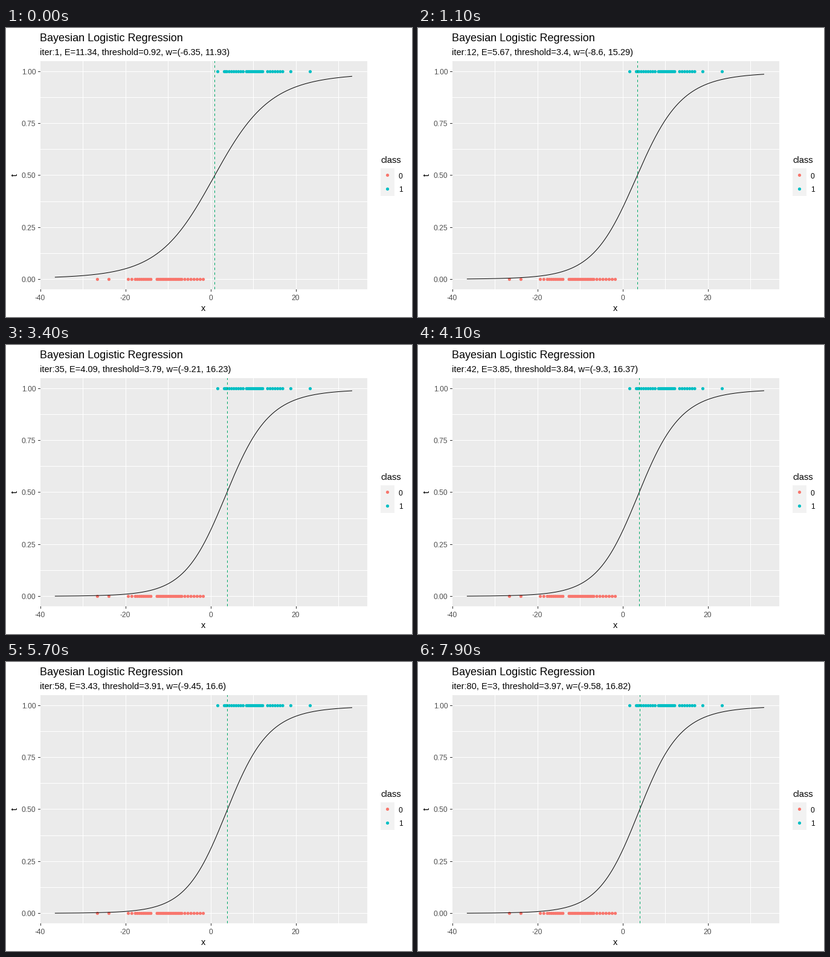
Recreate the animation shown at these times as a matplotlib script. Size 672 by 480 pixels, loop 8000 ms.

```python
import numpy as np
import matplotlib.pyplot as plt
from matplotlib.animation import FuncAnimation
from matplotlib.patches import Circle, Rectangle

W, H, DPI = 672, 480, 96
FRAMES, INTERVAL = 80, 100
PX = 72 / DPI                      # one pixel in points
RED, TEAL, GREEN = "#F8766D", "#00BFC4", "#00A968"
LEFT, TOP, RIGHT, BOTTOM = 57, 55, 598, 434

plt.rcParams["font.family"] = "Liberation Sans"
fig = plt.figure(figsize=(W / DPI, H / DPI), dpi=DPI, facecolor="white")
ax = fig.add_axes([0, 0, 1, 1])
ax.set_xlim(0, W)
ax.set_ylim(H, 0)
ax.axis("off")


def to_px(x):
    return 338.9 + 7.05 * np.asarray(x)


def to_py(t):
    return 417 - 345 * np.asarray(t)


def center(v):
    """Middle of the pixel nearest to v."""
    return np.round(v) + 0.5


def sigmoid(a):
    return 1 / (1 + np.exp(-a))


def rect(x, y, w, h, color):
    ax.add_patch(Rectangle((x, y), w, h, fc=color, lw=0, zorder=0))


def line(xs, ys, color, z=1, **kw):
    return ax.plot(xs, ys, color=color, lw=PX, zorder=z, snap=False,
                   solid_capstyle="butt", dash_capstyle="butt", **kw)[0]


def label(x, y, s, size, color="black", ha="left", **kw):
    return ax.text(x, y, s, size=size, color=color, ha=ha, va="baseline", **kw)


def dots(xs, y, color):
    for x in xs:
        ax.add_patch(Circle((x, y), 2.6, fc=color, lw=0, zorder=2))


# Panel, grid, axes
rect(LEFT, TOP, RIGHT - LEFT, BOTTOM - TOP, "#EBEBEB")
for x in range(-30, 31, 10):
    line([center(to_px(x))] * 2, [TOP, BOTTOM], "white")
for t in np.arange(0, 1.01, 0.125):
    line([LEFT, RIGHT], [center(to_py(t))] * 2, "white")
for x in range(-40, 21, 20):
    c = center(to_px(x))
    line([c, c], [BOTTOM, BOTTOM + 4], "#333333")
    label(c - 1, 451.5, str(x), 9, "#4D4D4D", "center")
for t in np.arange(0, 1.01, 0.25):
    c = center(to_py(t))
    line([LEFT - 4, LEFT], [c, c], "#333333")
    label(49.5, c + 4.5, f"{t:.2f}", 9, "#4D4D4D", "right")
label(326.5, 469.5, "x", 11, ha="center")
label(19, 244, "t", 11, ha="center", rotation=90, rotation_mode="anchor")


def spread(ranks, values):
    """Observations placed evenly between a few ranked values."""
    return np.interp(np.arange(ranks[-1] + 1), ranks, values)


class0 = spread([0, 1, 2, 4, 12, 13, 28, 35],
                [-26.6, -23.9, -19.35, -17.7, -14.05, -12.6, -6.8, -1.75])
class1 = spread([0, 1, 3, 10, 11, 22, 23, 29, 30, 31],
                [1.65, 3.2, 3.8, 7.6, 8.4, 12.2, 13.35, 16.9, 18.8, 23.35])
dots(to_px(class0), center(to_py(0)), RED)
dots(to_px(class1), center(to_py(1)), TEAL)

# Legend
label(620, 224, "class", 11)
rect(620, 233, 23, 46, "#F2F2F2")
for y, name, color in ((244.5, "0", RED), (267.5, "1", TEAL)):
    dots([631.5], y, color)
    label(650, y + 5, name, 9)

label(56, 22, "Bayesian Logistic Regression", 13.5)
subtitle = label(56, 45, "", 11)


# Model: p(x) = sigmoid(w0 + w1 * basis(x)), training slows as a power law
def basis(x):
    return sigmoid(0.0495 * (x + 1.694))


def threshold(n):
    return 4.3 - 3.38 * n ** -0.5318


def weights(n):
    w1 = 19.6 - 7.67 * n ** -0.2315
    return -w1 * basis(threshold(n)), w1


def error(n):
    return 11.34 * n ** -0.2751 - 0.005 * (n - 1)


xs = np.linspace(-36.6, 33.2, 400)
curve = line(to_px(xs), xs, "black", 3)
cut = line([0, 0], [BOTTOM, TOP], GREEN, 4, linestyle=(0, (4, 4)))


def short(v):
    return f"{round(float(v), 2):g}"


def update(i):
    n = i + 1
    w0, w1 = weights(n)
    subtitle.set_text(f"iter:{n}, E={short(error(n))}, "
                      f"threshold={short(threshold(n))}, "
                      f"w=({short(w0)}, {short(w1)})")
    curve.set_ydata(to_py(sigmoid(w0 + w1 * basis(xs))) + 0.5)
    cut.set_xdata([center(to_px(threshold(n)))] * 2)
    return subtitle, curve, cut


anim = FuncAnimation(fig, update, frames=FRAMES, interval=INTERVAL,
                     repeat=True, repeat_delay=0, blit=False)
plt.show()
```
